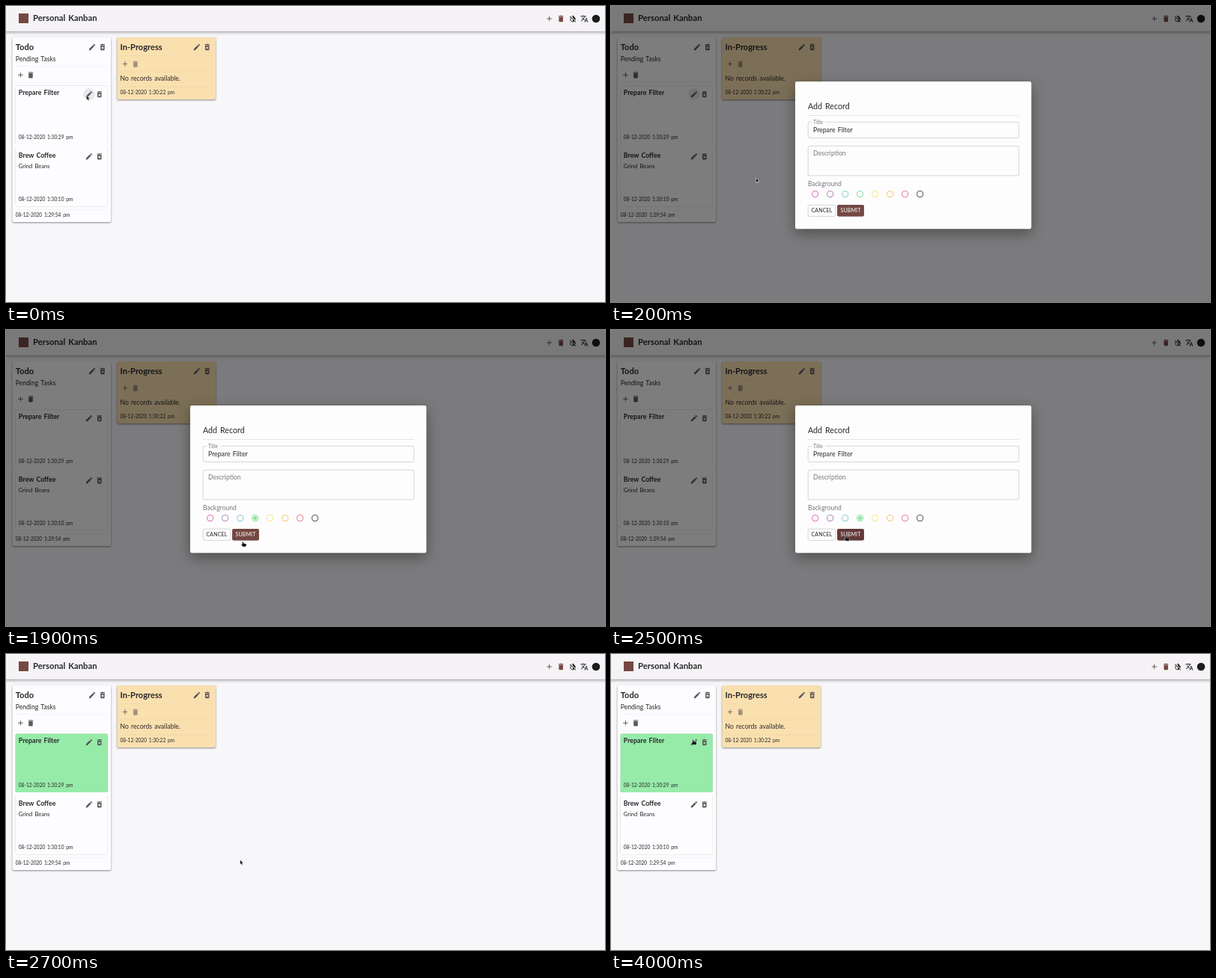
An HTML page for the animation above (4.1 s loop, 800x396 px).

```html
<!DOCTYPE html>
<html lang="en">
<head>
<meta charset="utf-8">
<title>Kanban board</title>
<style>
html, body { margin: 0; width: 100%; height: 100%; overflow: hidden; background: #f7f6f9; }
svg { display: block; width: 800px; height: 396px; font-family: Lato, "Open Sans", sans-serif; word-spacing: .07em; cursor: default; }
.bar { filter: drop-shadow(0 1.5px 2px rgba(0,0,0,.42)); }
.column { filter: drop-shadow(0 1px 1.3px rgba(0,0,0,.45)); }
.card { filter: drop-shadow(0 .7px .7px rgba(0,0,0,.38)); }
.paper { filter: drop-shadow(0 6px 9px rgba(0,0,0,.36)); }
</style>
</head>
<body>
<svg id="stage" viewBox="0 0 800 396" xmlns="http://www.w3.org/2000/svg"></svg>
<script>
const LOOP = 4100, STEP = 100;
const OPEN = 170, PICK = 1200, CLOSE = 2550, CLOSE_TIME = 150;
const INK = '#29282b', GREY = '#77767a', BROWN = '#754842';

const ICONS = {
  add: 'M19 13h-6v6h-2v-6H5v-2h6V5h2v6h6v2z',
  bin: 'M6 19c0 1.1.9 2 2 2h8c1.1 0 2-.9 2-2V7H6v12zM19 4h-3.5l-1-1h-5l-1 1H5v2h14V4z',
  binX: 'M6 19c0 1.1.9 2 2 2h8c1.1 0 2-.9 2-2V7H6v12zm2.46-7.12l1.41-1.41L12 12.59l2.12-2.12 1.41 1.41L13.41 14l2.12 2.12-1.41 1.41L12 15.41l-2.12 2.12-1.41-1.41L10.59 14l-2.13-2.12zM15.5 4l-1-1h-5l-1 1H5v2h14V4z',
  edit: 'M3 17.25V21h3.75L17.81 9.94l-3.75-3.75L3 17.25zM20.71 7.04c.39-.39.39-1.02 0-1.41l-2.34-2.34c-.39-.39-1.02-.39-1.41 0l-1.83 1.83 3.75 3.75 1.83-1.83z',
  lang: 'M12.87 15.07l-2.54-2.51.03-.03c1.74-1.94 2.98-4.17 3.71-6.53H17V4h-7V2H8v2H1v1.99h11.17C11.5 7.92 10.44 9.75 9 11.35 8.07 10.32 7.3 9.19 6.69 8h-2c.73 1.63 1.73 3.17 2.98 4.56l-5.09 5.02L4 19l5-5 3.11 3.11.76-2.04zM18.5 10h-2L12 22h2l1.12-3h4.75L21 22h2l-4.5-12zm-2.62 7l1.62-4.33L19.12 17h-3.24z',
  drop: 'M20.65 20.87l-2.35-2.35-6.3-6.29-3.56-3.57-1.42-1.41L4.27 4.5 3 5.77l2.78 2.78c-2.55 3.14-2.36 7.76.56 10.69C7.9 20.8 9.95 21.58 12 21.58c1.79 0 3.57-.59 5.03-1.78l2.7 2.7L21 21.23l-.35-.36zM12 19.59c-1.6 0-3.11-.62-4.24-1.76C6.62 16.69 6 15.19 6 13.59c0-1.32.43-2.57 1.21-3.6L12 14.77v4.82zM12 5.1v4.58l7.25 7.26c1.37-2.96.84-6.57-1.6-9.01L12 2.27l-3.7 3.7 1.41 1.41L12 5.1z'
};

const text = (x, y, size, str, weight = 400, fill = INK, extra = '') =>
  `<text x="${x}" y="${y}" font-size="${size}" font-weight="${weight}" fill="${fill}" ${extra}>${str}</text>`;
const rect = (x, y, w, h, fill, extra = '') =>
  `<rect x="${x}" y="${y}" width="${w}" height="${h}" fill="${fill}" ${extra}/>`;
const icon = (name, x, y, fill = '#5b595c') =>
  `<path transform="translate(${x} ${y}) scale(.4625) translate(-12 -12)" fill="${fill}" d="${ICONS[name]}"/>`;
const rule = (x, y, w, alpha = .06) => rect(x, y, w, .6, '#000', `fill-opacity="${alpha}"`);
const tools = (x, y) => icon('edit', x, y) + icon('binX', x + 13.8, y);

function card(y, title, note, date, id) {
  return rect(12.7, y, 123.1, 78.2, '#fdfcfe', `id="${id}" class="card" rx="1.8"`) +
    `<circle id="${id}Hover" cx="111" cy="${y + 11.3}" r="8" fill="#000" opacity="0"/>` +
    text(16.8, y + 12.6, 8.8, title, 700) + text(16.8, y + 110 - 83.5, 7.6, note) +
    text(16.8, y + 71, 6.6, date) + tools(111, y + 11.3);
}

function column(x, h, fill, title, date) {
  return rect(x, 42, 131.6, h, fill, 'class="column" rx="2"') +
    text(x + 4.1, 58.6, 11.1, title, 700) + tools(x + 106.5, 55) +
    text(x + 4.1, 42 + h - 7, 6.6, date);
}

const board =
  rect(0, 0, 800, 396, '#f7f6f9') +
  rect(-5, -5, 810, 38.8, '#f5f3f5', 'class="bar"') +
  rect(17, 10, 13, 13, BROWN) +
  text(36, 20.4, 11.3, 'Personal Kanban', 700) +
  icon('add', 725.6, 17) + icon('bin', 741.2, 17, BROWN) +
  icon('drop', 757, 17, INK) + icon('lang', 772.4, 17, INK) +
  '<circle cx="788" cy="17" r="5.3" fill="#1d1c1e"/>' +
  column(8.6, 247, '#fdfcfe', 'Todo', '08-12-2020 1:29:54 pm') +
  text(12.7, 74, 8.65, 'Pending Tasks') +
  rule(12.7, 80.5, 123) + icon('add', 19.4, 92.3) + icon('bin', 33, 92.3) +
  rule(12.7, 102, 123) + rule(12.7, 272, 123) +
  card(106.8, 'Prepare Filter', '', '08-12-2020 1:30:29 pm', 'filter') +
  card(190, 'Brew Coffee', 'Grind Beans', '08-12-2020 1:30:10 pm', 'coffee') +
  column(148.4, 83, '#fae0af', 'In-Progress', '08-12-2020 1:30:22 pm') +
  rule(152.5, 66.5, 123) + icon('add', 159, 77.6) + icon('bin', 172.8, 77.6, '#9d9079') +
  rule(152.5, 87.8, 123) + text(152.5, 100.3, 8.6, 'No records available.') +
  rule(152.5, 107.8, 123);

const SWATCHES = ['#de78c4', '#a995c0', '#8ed0d4', '#8be29d', '#f7e88f', '#f4ca7c', '#ee8298', '#5c5a60'];
const swatches = SWATCHES.map((c, i) =>
  `<circle cx="${272.7 + 20 * i}" cy="251.6" r="4.1" fill="none" stroke="${c}" stroke-width="1.1"/>`).join('');

const BORDER = 'stroke="#c5c3c7" stroke-width=".7" rx="2"';
const form =
  rect(246, 101, 315.4, 197.3, '#fefdfe', 'class="paper" rx="2.2"') +
  text(263, 138, 10.7, 'Add Record') + rule(263, 146.4, 282, .16) +
  rect(263.2, 155.3, 281.6, 21.2, 'none', BORDER) + rect(268, 154, 18, 3, '#fefdfe') +
  text(270, 157.8, 6.7, 'Title', 400, GREY) + text(270, 168.8, 8.7, 'Prepare Filter') +
  rect(263.2, 187.3, 281.6, 39.6, 'none', BORDER) + text(270, 200.2, 8.55, 'Description', 400, GREY) +
  text(263, 240.6, 8.6, 'Background', 400, GREY) +
  '<circle id="halo" cx="332.7" cy="251.6" r="10.5" fill="#567" fill-opacity=".12"/>' +
  swatches + `<circle id="dot" cx="332.7" cy="251.6" r="2.6" fill="${SWATCHES[3]}"/>` +
  rect(263.2, 266.2, 36.6, 15.2, 'none', BORDER) +
  text(281.5, 276.3, 7, 'CANCEL', 400, INK, 'text-anchor="middle" letter-spacing=".14"') +
  rect(302.1, 266, 35.8, 15.6, BROWN, 'id="submit" class="card" rx="2"') +
  text(320, 276.3, 7, 'SUBMIT', 400, '#fff', 'text-anchor="middle" letter-spacing=".14"');

const pointer = '<path id="arrow" d="M0 0V6.4L1.5 5.1L2.5 7.4L3.5 6.9L2.5 4.7L4.5 4.6Z" fill="#111" stroke="#fff" stroke-width=".5"/>' +
  '<path id="hand" d="M0 .6Q.9-.6 1.6.6L2.2 2.3L5 2.9Q6.2 3.2 5.9 4.6L5.1 7H1.4L-1.2 4.5Q-1.2 3.3.6 3.7Z" fill="#111" stroke="#fff" stroke-width=".4"/>';

document.getElementById('stage').innerHTML = board +
  rect(0, 0, 800, 396, '#000', 'id="shade"') +
  `<g id="form">${form}</g>` +
  rect(387, 179, 33.6, 41.8, '#fefdfe', 'id="empty" class="paper" rx="2"') +
  `<g id="pointer">${pointer}</g>`;

// Pointer stops: time, x, y
const PATH = [
  [0, 107.6, 119.6], [200, 193.5, 230], [500, 193.5, 230], [950, 333, 247],
  [1300, 333, 247], [1700, 315.2, 283], [2000, 315.2, 283], [2300, 312.6, 275.3],
  [3200, 312.6, 275.3], [3600, 264, 254], [4000, 108.4, 114.6], [LOOP, 108.4, 114.6]
];

const $ = id => document.getElementById(id);
const ease = p => { p = Math.min(1, Math.max(0, p)); return p * p * (3 - 2 * p); };
const within = (t, a, b) => t >= a && t < b;
const show = (id, on) => $(id).setAttribute('visibility', on ? 'visible' : 'hidden');
const set = (id, name, value) => $(id).setAttribute(name, value);

function place(t) {
  let i = 0;
  while (i < PATH.length - 2 && t >= PATH[i + 1][0]) i++;
  const [t0, x0, y0] = PATH[i], [t1, x1, y1] = PATH[i + 1];
  const p = ease((t - t0) / (t1 - t0));
  return `translate(${x0 + (x1 - x0) * p} ${y0 + (y1 - y0) * p})`;
}

function draw(t) {
  const closing = t >= CLOSE;
  const alpha = closing ? 1 - ease((t - CLOSE) / CLOSE_TIME) : ease(t / OPEN);
  set('shade', 'opacity', alpha * .5);
  set('form', 'opacity', closing ? 0 : alpha);
  set('empty', 'opacity', closing ? alpha : 0);
  set('filter', 'fill', closing ? '#97eba9' : '#fdfcfe');
  set('filterHover', 'opacity', t < 500 ? .08 : 0);
  set('submit', 'fill', within(t, 2200, CLOSE) ? '#63393a' : BROWN);
  show('halo', within(t, 900, 1400));
  show('dot', t >= PICK);
  const hand = within(t, 900, CLOSE) || t >= 4000;
  show('hand', hand);
  show('arrow', !hand);
  set('pointer', 'transform', place(t));
}

function tick() {
  const t = performance.now() % LOOP;
  draw(Math.floor(t / STEP) * STEP);
  requestAnimationFrame(tick);
}
tick();
</script>
</body>
</html>
```
